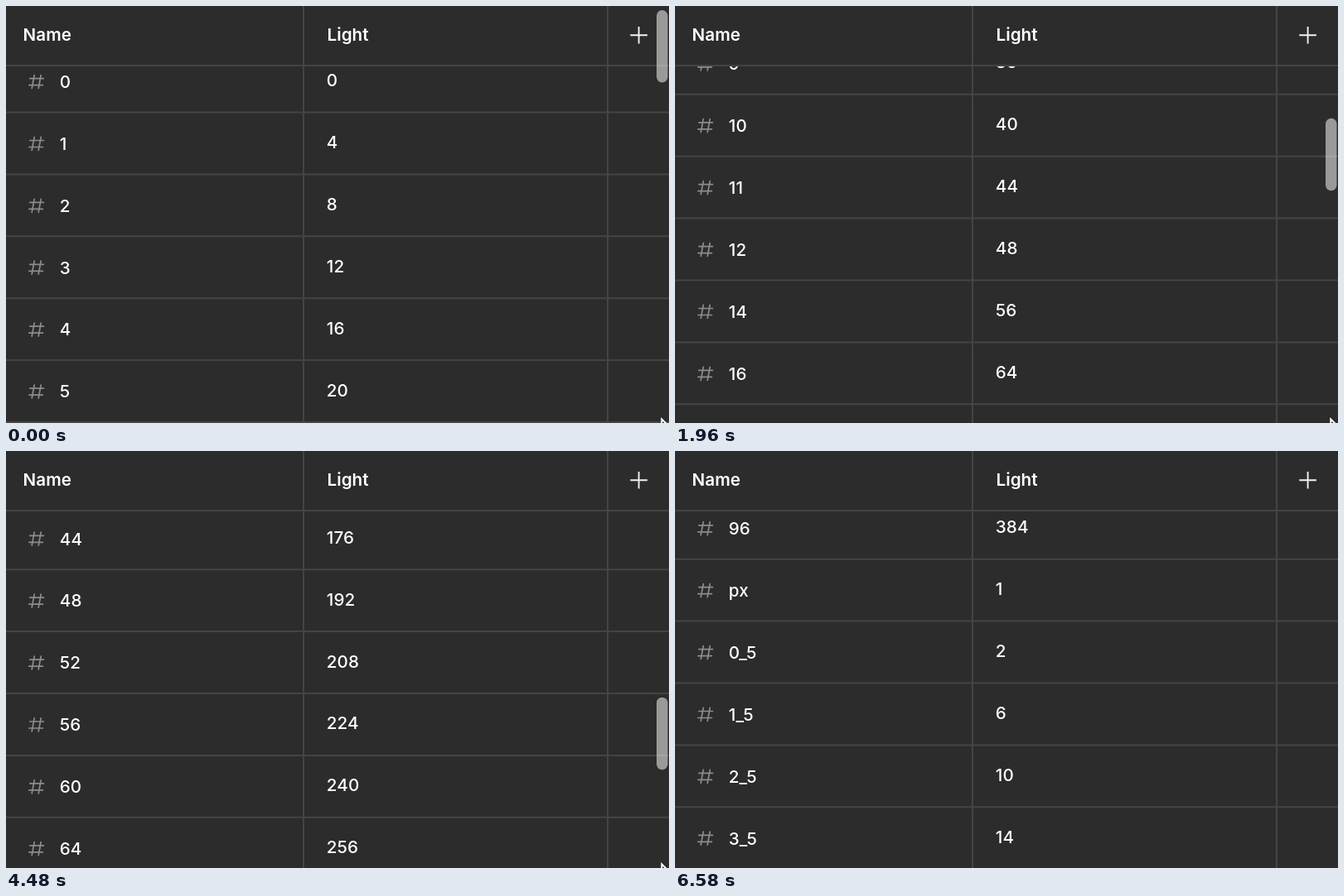
An HTML page for the animation above (6720 ms loop, 800 by 504 pixels).

```html
<!DOCTYPE html>
<html lang="en">
<head>
<meta charset="utf-8">
<title>Variables table</title>
<style>
  html, body { margin: 0; width: 100%; height: 100%; overflow: hidden; background: #2c2c2c; }
  svg { display: block; width: 800px; height: 504px; }
  text { font: 450 20.6px Inter, "Liberation Sans", sans-serif; letter-spacing: .005em; fill: #fff; }
  .head { font-weight: 600; }
  .grid { stroke: #444; stroke-width: 2; fill: none; }
  .hash { stroke: #8c8c8c; stroke-width: 1.7; fill: none; stroke-linecap: round; }
  .plus { stroke: #f2f2f2; stroke-width: 1.9; }
</style>
</head>
<body>
<svg viewBox="0 0 800 504">
  <defs>
    <clipPath id="body"><rect y="72" width="800" height="432"/></clipPath>
    <path id="hash" class="hash" d="M34.2 83.5L31.2 99.5M42.2 83.5L39.2 99.5M28.8 87.6H45.4M27.8 95.6H44.4"/>
  </defs>
  <rect width="800" height="504" fill="#2c2c2c"/>
  <g clip-path="url(#body)"><g id="rows"></g></g>
  <path class="grid" d="M0 72H800M359 0V504M726 0V504"/>
  <text class="head" x="20.5" y="42.4">Name</text>
  <text class="head" x="387.4" y="42.4">Light</text>
  <path class="plus" d="M753.3 35.3H773.9M763.6 25V45.6"/>
  <rect id="bar" x="785" y="5" width="13.5" height="87.5" rx="6.75" fill="#fff" fill-opacity=".52"/>
  <path id="cursor" d="M791.3 499.5V526L797 520L809 517Z" fill="#000" stroke="#fff" stroke-width="2"/>
</svg>
<script>
  const LOOP = 6720, STEP = 70, PITCH = 74.9;
  const SCROLL_END = 6300, FADE_START = 6300, FADE_TIME = 280;
  const $ = id => document.getElementById(id);

  const range = (from, to, by) =>
    Array.from({ length: (to - from) / by + 1 }, (_, i) => from + i * by);
  const names = [...range(0, 12, 1), 14, ...range(16, 64, 4), 72, 80, 96,
    'px', '0_5', '1_5', '2_5', '3_5'].map(String);
  const lightValue = name => name === 'px' ? 1 : 4 * name.replace('_', '.');

  $('rows').innerHTML = names.map((name, i) => `
    <g transform="translate(0 ${(i * PITCH).toFixed(1)})">
      <use href="#hash"/>
      <text x="64.8" y="98.9">${name}</text>
      <text x="386.8" y="97.1">${lightValue(name)}</text>
      <path class="grid" d="M0 128.5H800"/>
    </g>`).join('');

  // Time in ms, scroll offset in px, speed in px per ms
  const keys = [
    [0, 0, .3], [1260, 493.3, .34], [1960, 695.8, .29], [3010, 1004.6, .335],
    [4480, 1558.2, .368], [5250, 1835.8, .37], [SCROLL_END, 2169.9, 0]
  ];

  function scrollAt(t) {
    if (t >= SCROLL_END) return keys[keys.length - 1][1];
    const i = keys.findIndex(k => k[0] > t);
    const [t0, y0, v0] = keys[i - 1], [t1, y1, v1] = keys[i];
    const d = t1 - t0, u = (t - t0) / d, w = 1 - u;
    return w * w * ((1 + 2 * u) * y0 + u * d * v0)
         + u * u * ((1 + 2 * w) * y1 - w * d * v1);
  }

  function draw(now) {
    const t = Math.floor(now % LOOP / STEP) * STEP;
    const y = scrollAt(t);
    $('rows').setAttribute('transform', `translate(0 ${-y})`);
    $('bar').setAttribute('y', 5 + y * .1878);
    $('bar').setAttribute('opacity',
      Math.min(1, Math.max(0, 1 - (t - FADE_START) / FADE_TIME)));
    $('cursor').setAttribute('visibility', t < SCROLL_END ? 'visible' : 'hidden');
  }

  const start = performance.now();
  function tick() {
    draw(performance.now() - start);
    requestAnimationFrame(tick);
  }
  tick();
</script>
</body>
</html>
```
